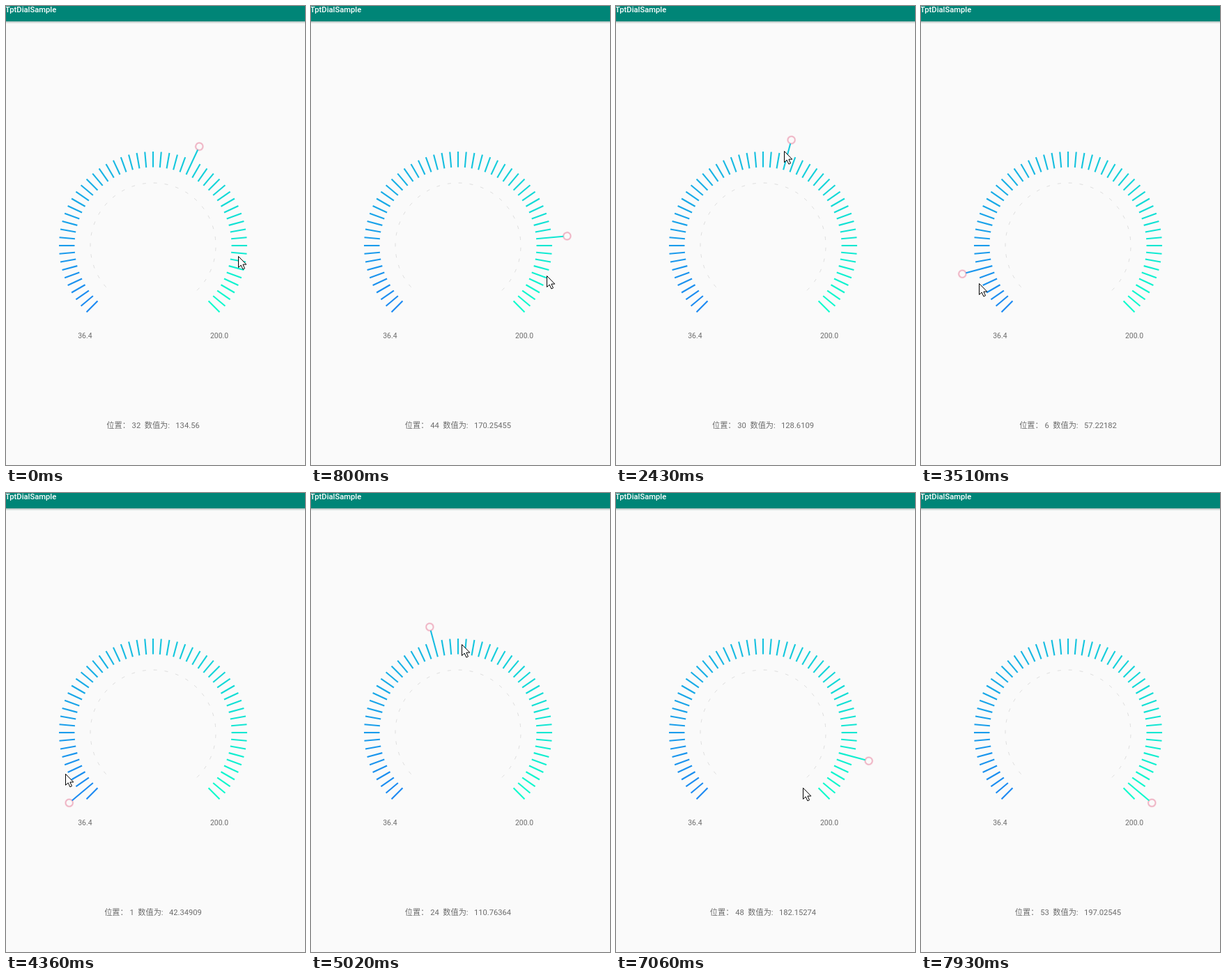
Write an HTML page with a canvas that moves like this. It is 429 px wide and 659 px high and loops after 8.5 s.

```html
<!DOCTYPE html>
<html lang="zh-CN">
<head>
<meta charset="utf-8">
<title>TptDialSample</title>
<style>
  html, body { margin: 0; height: 100%; overflow: hidden; background: #fafafa; }
  canvas { display: block; }
</style>
</head>
<body>
<canvas width="429" height="659"></canvas>
<script>
const ctx = document.querySelector('canvas').getContext('2d');
const LOOP = 8500, CX = 211, CY = 344, LAST = 54, EXIT = 7930;
const MIN = Math.fround(36.4), MAX = 200;
const STEP = Math.fround(Math.fround(MAX - MIN) / (LAST + 1));
const FONT = 'Roboto, "Noto Sans CJK SC", "Noto Sans CJK", sans-serif';
const rad = degrees => degrees * Math.PI / 180;
const lerp = (a, b, f) => a + (b - a) * f;

// Screen refreshes come in bursts: first, last, count.
const bursts = [
  [250, 1190, 7], [1340, 1340, 1], [1740, 2700, 8], [2850, 3780, 8],
  [3930, 3930, 1], [4360, 5320, 8], [5440, 6370, 8], [6520, 7450, 8],
  [7570, EXIT, 4]
];

// The drag: time, dial position, pointer angle, pointer radius.
const drag = [
  [0, 32, 96.8, 123], [1190, 52, 117, 141], [1340, 52, 115.4, 136],
  [1740, 49, 98.3, 141.5], [2400, 30, 12.4, 139.5], [3510, 6, -113, 139],
  [3930, 0, -130, 135], [4360, 1, -115, 139], [5020, 24, 2.3, 127],
  [5320, 33, 40, 118], [6100, 39, 99, 111], [6370, 39, 120, 105],
  [7450, 53, 160, 93], [EXIT, 53, 145, 383]
];

// Latest refresh at or before the given time, on a 30 ms grid.
function refreshTime(time) {
  const burst = bursts.findLast(b => b[0] <= time);
  if (!burst) return 0;
  const [first, last, count] = burst;
  let latest = first;
  for (let i = 1; i < count; i++) {
    const t = first + Math.floor((last - first) * i / (count - 1) / 30) * 30;
    if (t <= time) latest = t;
  }
  return latest;
}

function poseAt(t) {
  const i = Math.min(drag.findLastIndex(k => k[0] <= t), drag.length - 2);
  const [a, b] = [drag[i], drag[i + 1]];
  const f = (t - a[0]) / (b[0] - a[0]);
  const [, position, angle, radius] = a.map((v, n) => lerp(v, b[n], f));
  return {
    position: Math.round(position),
    x: Math.round(CX + radius * Math.sin(rad(angle))),
    y: Math.round(CY - radius * Math.cos(rad(angle)))
  };
}

// Shortest decimal that identifies a single-precision number.
function floatText(value) {
  let n = 1;
  while (Math.fround(value.toPrecision(n)) !== value) n++;
  const text = String(Number(value.toPrecision(n)));
  return text.includes('.') ? text : text + '.0';
}

const valueAt = p => Math.fround(Math.fround(STEP * (p + 1)) + MIN);

function label(text, x, y, font, color = '#6c6c6c', align = 'center') {
  ctx.font = `${font} ${FONT}`;
  ctx.fillStyle = color;
  ctx.textAlign = align;
  ctx.fillText(text, x, y);
}

function drawBar() {
  ctx.fillStyle = '#008577';
  ctx.fillRect(0, 0, 429, 22);
  const shade = ctx.createLinearGradient(0, 22, 0, 25.5);
  shade.addColorStop(0, '#b0bfbd');
  shade.addColorStop(1, '#fafafa');
  ctx.fillStyle = shade;
  ctx.fillRect(0, 22, 429, 4);
  label('TptDialSample', -1, 9, '500 11.2px', '#fff', 'left');
}

function drawInnerArc() {
  ctx.strokeStyle = '#d6d6d6';
  ctx.lineWidth = 0.8;
  for (let i = 0; i < 27; i++) {
    const a = rad(138.5 + i * 10.15);
    ctx.beginPath();
    ctx.arc(CX, CY, 90, a, a + 0.055);
    ctx.stroke();
  }
}

function drawKnob() {
  ctx.beginPath();
  ctx.arc(0, -157, 5.2, 0, 7);
  for (const [width, color] of [[3, '#f9dfe6'], [1.5, '#edb3c3']]) {
    ctx.lineWidth = width;
    ctx.strokeStyle = color;
    ctx.stroke();
  }
}

function drawDial(position) {
  for (let i = 0; i <= LAST; i++) {
    const f = i / LAST;
    ctx.save();
    ctx.translate(CX, CY);
    ctx.rotate(rad(i * 5 - 135));
    if (i === position) drawKnob();
    ctx.lineWidth = 2.1;
    ctx.strokeStyle = `rgb(${lerp(28, 14, f)},${lerp(137, 251, f)},${lerp(242, 204, f)})`;
    ctx.beginPath();
    ctx.moveTo(0, -112.5);
    ctx.lineTo(0, i === position ? -151.7 : -135);
    ctx.stroke();
    ctx.restore();
  }
}

const arrow = new Path2D('M0 0V16L3.7 12.6L6.4 18.5L9 17.3L6.4 11.6H11.3Z');

function drawPointer(x, y) {
  ctx.save();
  ctx.translate(x + 0.5, y + 0.5);
  ctx.fillStyle = '#fff';
  ctx.strokeStyle = '#000';
  ctx.lineWidth = 1;
  ctx.fill(arrow);
  ctx.stroke(arrow);
  ctx.restore();
}

function draw(now) {
  const t = refreshTime(now % LOOP);
  const { position, x, y } = poseAt(t);
  ctx.fillStyle = '#fafafa';
  ctx.fillRect(0, 0, 429, 659);
  drawBar();
  drawInnerArc();
  drawDial(position);
  label('36.4', 113.4, 477, '10.4px');
  label('200.0', 306, 477, '10.4px');
  label(`位置： ${position}  数值为:   ${floatText(valueAt(position))}`, 211, 606, '11.2px');
  if (t < EXIT) drawPointer(x, y);
  requestAnimationFrame(draw);
}
requestAnimationFrame(draw);
</script>
</body>
</html>
```
